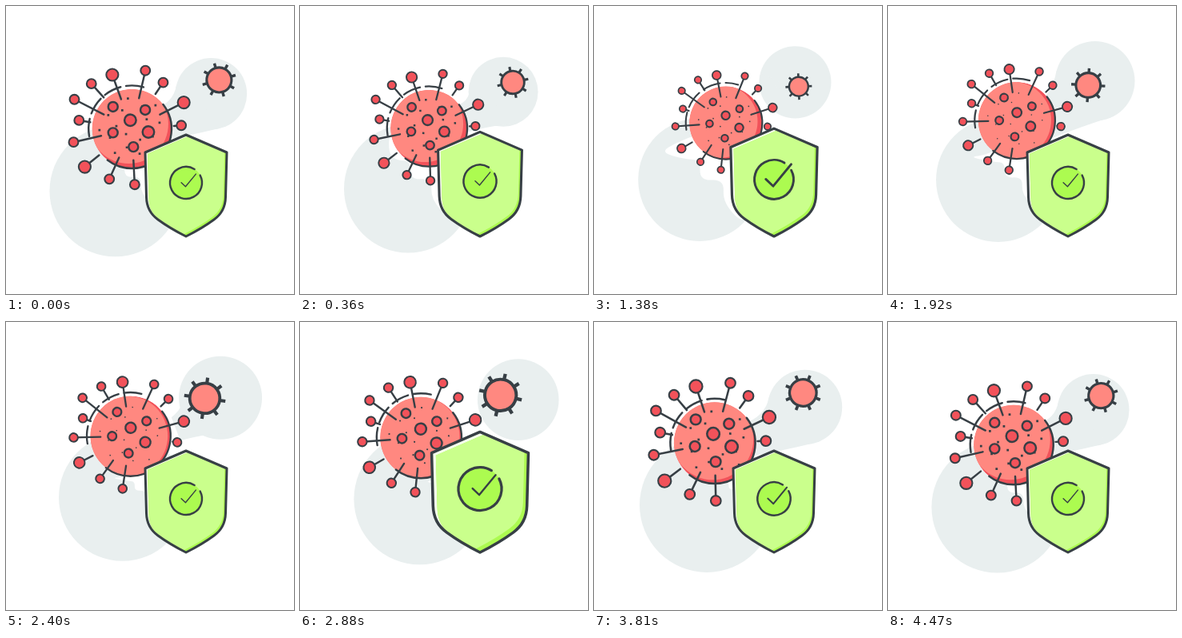
These frames come from a looping animation (360 px wide and 360 px high, 4500 ms). An HTML page with a canvas:

```html
<!DOCTYPE html>
<html lang="en">
<head>
<meta charset="utf-8">
<title>Virus shield</title>
<style>
  html, body { margin: 0; height: 100%; overflow: hidden; background: #fff; }
  canvas { display: block; width: 100vw; height: 100vh; }
</style>
</head>
<body>
<canvas></canvas>
<script>
const LOOP = 4500, TAU = Math.PI * 2, RAD = Math.PI / 180;
const INK = '#373f45', GREY = '#e9efef', CORAL = '#ff8880', RED = '#f2525a';
const PALE = '#f5fdec', LIME = '#caff8c', GREEN = '#acfb50';

const canvas = document.querySelector('canvas');
const g = canvas.getContext('2d');
let t = 0;

// Cyclic motion: one swing per loop peaking at `peak` degrees, plus a smaller double swing.
const wave = (mean, amp, peak, amp2 = 0, peak2 = 0) => {
  const deg = 360 * t / LOOP;
  return mean + amp * Math.cos((deg - peak) * RAD) + amp2 * Math.cos((2 * deg - peak2) * RAD);
};
const ease = v => { v = Math.max(0, Math.min(1, v)); return v * v * (3 - 2 * v); };
const pulse = (time, up, down) => ease((time - up) / 450) - ease((time - down) / 430);
const polar = (deg, r) => [r * Math.cos(deg * RAD), r * Math.sin(deg * RAD)];

function paint(fill, width, path) {
  if (fill) { g.fillStyle = fill; path ? g.fill(path) : g.fill(); }
  if (width) { g.strokeStyle = INK; g.lineWidth = width; path ? g.stroke(path) : g.stroke(); }
}

function disc(x, y, r, fill, width) {
  g.beginPath();
  g.arc(x, y, r, 0, TAU);
  paint(fill, width);
}

function line(width, ...points) {
  g.beginPath();
  for (const p of points) g.lineTo(...p);
  paint(null, width);
}

function arc(r, from, to, width) {
  g.beginPath();
  g.arc(0, 0, r, from * RAD, to * RAD);
  paint(null, width);
}

function closedCurve(points, fill) {
  const n = points.length;
  const mid = i => points[i % n].map((v, k) => (v + points[(i + 1) % n][k]) / 2);
  g.beginPath();
  g.moveTo(...mid(0));
  for (let i = 1; i <= n; i++) g.quadraticCurveTo(...points[i % n], ...mid(i));
  paint(fill);
}

function backdrop() {
  disc(wave(139.5, 8, 245, 2.4, 80), wave(223.3, 7, -25, 1.6), wave(80.5, 3.7, -65), GREY);

  // white wash that laps over the large disc from behind the virus
  const lap = wave(.6, .42, 80);
  const shore = [
    [150, 150], [100, wave(163, -18, 0)], [wave(82, 18, 10), 182], [111, 191], [131, 192],
    [130, 219], [162, 217], [160, 248], [192, 280], [215, 220], [200, 160]
  ];
  closedCurve(shore.map(([x, y]) => [185 + (x - 185) * lap, 205 + (y - 205) * lap]), '#fff');

  // small disc with a neck that stretches towards the virus and snaps back
  const x = wave(260.5, 10.5, 245, 2.2, 80), y = wave(100.8, 8, -14, 1.2);
  const r = wave(47, 4.2, 215, 1.2);
  const reach = 1 - pulse(t, 250, 1250) - pulse(t, 2250, 3150);
  const pull = (px, py) => [x + (px - x) * reach, y + (py - y) * reach];
  const rim = deg => { const [dx, dy] = polar(deg, r); return [x + dx, y + dy]; };
  const [lx, ly] = rim(195), [bx, by] = rim(65);
  disc(x, y, r, GREY);
  g.beginPath();
  g.moveTo(lx, ly);
  g.quadraticCurveTo(...pull(lx - 4, ly + 24), ...pull(185, 128));
  g.lineTo(...pull(200, 167));
  g.quadraticCurveTo(...pull(bx - 27, by + 8), bx, by);
  paint(GREY);
}

// Spikes as [angle, length]: some are rooted on the face, some at the rim.
const FACE = [[87, 71], [114, 70], [167, 76], [207, 82], [250, 73], [283, 76], [333, 74]];
const RIM = [[141, 77], [189, 68], [228, 77], [304, 71], [356, 63]];
const LARGE = [141, 250, 333];
const SPOTS = [[-2, -11], [21, 4], [-24, -28], [17, -24], [-24, 5], [2, 23]];

function virus() {
  const s = wave(.932, .09, -70, .022, -20);
  const r = wave(48.8, 2.8, 270, .8);
  const speck = wave(2.05, .75, -25);
  const spin = wave(6, -6, -10) * RAD;
  const w = 2.5 * s;

  g.save();
  g.translate(wave(157.3, 8, 90), wave(148, 5.5, 0));
  g.save();
  g.rotate(spin);
  for (const [deg, len] of RIM) line(w, polar(deg, r + 3), polar(deg, len * s));
  g.restore();

  g.save();
  g.beginPath();
  g.arc(0, 0, r, 0, TAU);
  g.clip();
  disc(0, 0, r, RED);
  disc(wave(-4, -2, 90), wave(-3, -3, 0), r, CORAL);
  g.restore();
  arc(r, -38, 128, w);
  g.setLineDash([22, 7]);
  arc(r + 4.5, 170, 288, w);
  g.setLineDash([]);

  g.rotate(spin);
  g.fillStyle = INK;
  for (let i = 1; i < 19; i++) {
    const [x, y] = polar(i * 137.5, 10 * Math.sqrt(i) * s);
    g.fillRect(x - speck / 2, y - speck / 2, speck, speck);
  }
  SPOTS.forEach(([x, y], i) => disc(x * s, y * s, (i < 2 ? 7.5 : 6.2) * s * s, RED, w));
  for (const [deg, len] of FACE) line(w, polar(deg, 40 * s), polar(deg, len * s));
  for (const [deg, len] of [...FACE, ...RIM]) {
    disc(...polar(deg, len * s), (LARGE.includes(deg) ? 7.8 : 6.1) * s * s, RED, 2.1 * s);
  }
  g.restore();
}

const SHIELD = new Path2D(
  'M0-127 L51-105 L49.5-49 Q49-31 35-21 Q20-10 0 0 Q-20-10-35-21 Q-49-31-49.5-49 L-51-105Z');

function shield() {
  // shield, badge and tick swell one after the other, twice per loop
  const beat = t % (LOOP / 2);
  const s = 1 + .2 * pulse(beat, 255, 1110);
  const badge = pulse(beat, 345, 1245);
  const tick = pulse(beat, 435, 1380);
  const edge = 3 + 8 * (s - 1);

  g.save();
  g.translate(225, 288);
  g.scale(s, s);
  paint(PALE, 0, SHIELD);
  g.save();
  g.clip(SHIELD);
  g.translate(edge, edge * .6);
  paint(GREEN, 0, SHIELD);
  g.clip(SHIELD);
  g.translate(-edge * 1.9, -edge * 1.5);
  paint(LIME, 0, SHIELD);
  g.restore();
  paint(null, 3, SHIELD);

  g.translate(0, -67);
  g.scale(1 + .2 * badge, 1 + .2 * badge);
  disc(0, 0, 20, GREEN);
  arc(20, -28, 302, 2.4);
  const c = 14 + 6 * tick;
  line(1.4 + .9 * tick, [-.42 * c, -.02 * c], [-.04 * c, .34 * c], [.88 * c, -.78 * c]);
  g.restore();
}

function mini() {
  const r = wave(15.8, 3.5, 250, 1.2, 40);
  g.save();
  g.translate(wave(257.5, 9, 10), wave(94.5, 6.2, 110));
  g.rotate((45 * t / LOOP - 16) * RAD);
  g.lineCap = 'butt';
  for (let i = 0; i < 8; i++) {
    line(r * .22, [r, 0], [r * 1.38, 0]);
    g.rotate(TAU / 8);
  }
  disc(0, 0, r, CORAL, r * .2);
  g.restore();
}

function draw() {
  const dpr = window.devicePixelRatio || 1;
  const w = Math.round(innerWidth * dpr), h = Math.round(innerHeight * dpr);
  if (canvas.width !== w || canvas.height !== h) {
    canvas.width = w;
    canvas.height = h;
  }
  g.setTransform(w / 360, 0, 0, h / 360, 0, 0);
  g.fillStyle = '#fff';
  g.fillRect(0, 0, 360, 360);
  g.lineJoin = 'round';
  g.lineCap = 'round';
  backdrop();
  virus();
  shield();
  mini();
}

const start = performance.now();
function frame() {
  t = (performance.now() - start) % LOOP;
  draw();
  requestAnimationFrame(frame);
}
frame();
</script>
</body>
</html>
```
